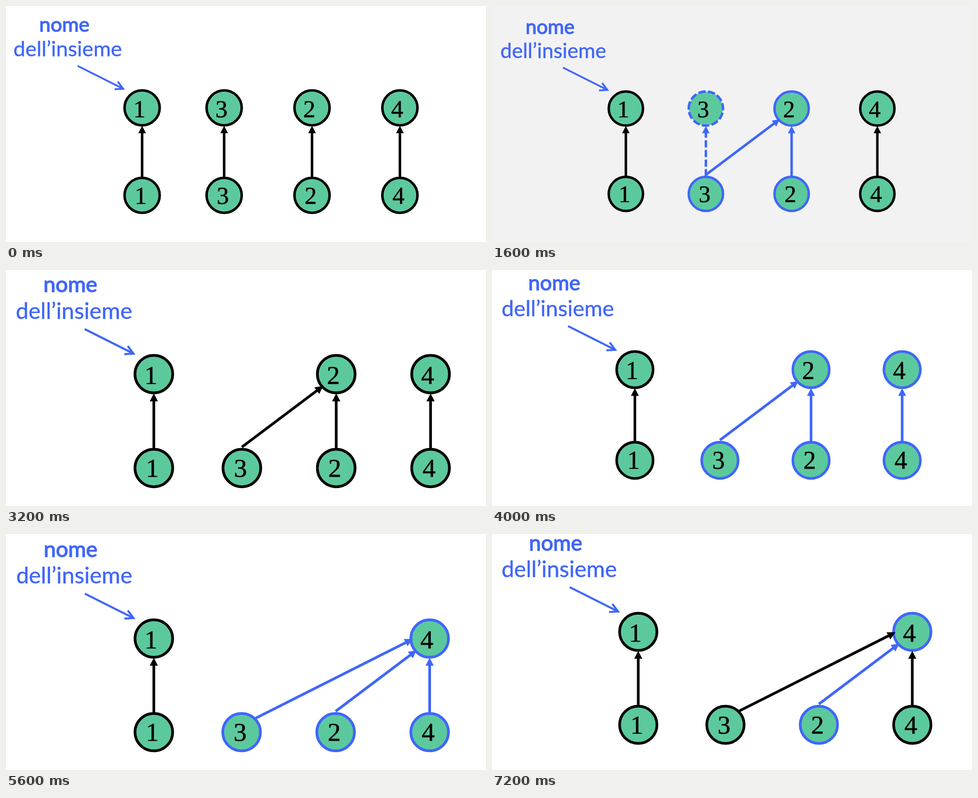
An HTML page with a canvas that plays this animation: 1065 by 526 pixels, repeating every 8000 ms.

```html
<!DOCTYPE html>
<html lang="it">
<head>
<meta charset="utf-8">
<title>Unione di insiemi</title>
<style>
  html, body { margin: 0; width: 100%; height: 100%; overflow: hidden; background: #fff; }
  canvas { display: block; }
</style>
</head>
<body>
<canvas id="stage" width="1065" height="526"></canvas>
<script>
const ctx = document.getElementById('stage').getContext('2d');
const STEP = 800;
const BLACK = '#000', BLUE = '#4066fa', GREEN = '#5cc99d';
const LINE = 5.6, RADIUS = 39, DROP = 195, DASH = [16.5, 5.5];
const columns = { 1: 0, 3: 182, 2: 377, 4: 572 };

// Each link is child, parent, style: k = black, b = blue, d = dashed blue.
// x, y: centre of the first root; span: distance from first to last column.
const scenes = [
  { x: 302,   y: 227,   span: 572, links: '11k 33k 22k 44k' },
  { x: 309.5, y: 237.5, span: 589, links: '11k 33b 22b 44k' },
  { x: 297,   y: 228.5, span: 558, links: '11k 33d 32b 22b 44k', paper: '#f2f2f2' },
  { x: 318,   y: 232,   span: 604, links: '11k 32b 22b 44k' },
  { x: 328,   y: 232,   span: 614, links: '11k 32k 22k 44k' },
  { x: 317,   y: 222,   span: 593, links: '11k 32b 22b 44b' },
  { x: 326,   y: 232.5, span: 614, links: '11k 32d 22d 34b 24b 44b' },
  { x: 328,   y: 233,   span: 612, links: '11k 34b 24b 44b' },
  { x: 305,   y: 235.5, span: 614, links: '11k 34k 24k 44k' },
  { x: 324.5, y: 218,   span: 608, links: '11k 34k 24b 44k' }
];

const colorOf = style => style === 'k' ? BLACK : BLUE;

function write(text, x, y, font, color, weight) {
  ctx.font = font;
  ctx.fillStyle = ctx.strokeStyle = color;
  ctx.lineWidth = weight;
  ctx.lineJoin = 'round';
  ctx.textAlign = 'center';
  ctx.fillText(text, x, y);
  ctx.strokeText(text, x, y);
  ctx.lineJoin = 'miter';
}

function strokePath(points, color, width) {
  ctx.beginPath();
  points.forEach(([x, y]) => ctx.lineTo(x, y));
  ctx.strokeStyle = color;
  ctx.lineWidth = width;
  ctx.stroke();
}

function drawLabel() {
  write('nome', -172.5, -170.5, '45px Lato, sans-serif', BLUE, 1.5);
  write('dell’insieme', -165, -115, '47px Lato, sans-serif', BLUE, 0.5);
  strokePath([[-143, -93.5], [-42, -42.5]], BLUE, 4.2);
  strokePath([[-61, -41.5], [-42, -42.5], [-54, -58.5]], BLUE, 4.2);
}

function drawNode(name, isRoot, style) {
  const x = columns[name], y = isRoot ? 0 : DROP;
  ctx.beginPath();
  ctx.arc(x, y, RADIUS, Math.PI, 3 * Math.PI);
  ctx.fillStyle = GREEN;
  ctx.fill();
  ctx.strokeStyle = colorOf(style);
  ctx.lineWidth = LINE;
  ctx.setLineDash(style === 'd' ? DASH : []);
  ctx.stroke();
  ctx.setLineDash([]);
  write(name, x - (isRoot ? 6 : 3), y + (isRoot ? 20.5 : 18.5),
    '54px "Liberation Serif", "Times New Roman", serif', BLACK, 0.6);
}

function linkEnds(child, parent) {
  const from = columns[child], to = columns[parent];
  if (child === parent) return [from, 155, to, 40];
  if (to - from > 300) return [from + 29, 166, to - 35, 1];
  return [from, 151.5, to - 27, 24.5];
}

function drawArrow([x1, y1, x2, y2], style) {
  const length = Math.hypot(x2 - x1, y2 - y1), head = 16.5;
  ctx.save();
  ctx.translate(x1, y1);
  ctx.rotate(Math.atan2(y2 - y1, x2 - x1));
  ctx.setLineDash(style === 'd' ? DASH : []);
  strokePath([[0, 0], [length - head + 1, 0]], colorOf(style), LINE);
  ctx.beginPath();
  ctx.moveTo(length, 0);
  ctx.lineTo(length - head, -8.5);
  ctx.lineTo(length - head, 8.5);
  ctx.fillStyle = colorOf(style);
  ctx.fill();
  ctx.restore();
}

function drawScene({ x, y, span, links, paper = '#fff' }) {
  const scale = span / columns[4];
  const list = links.split(' ').map(([child, parent, style]) => ({ child, parent, style }));
  ctx.setTransform(1, 0, 0, 1, 0, 0);
  ctx.fillStyle = paper;
  ctx.fillRect(0, 0, 1065, 526);
  ctx.setTransform(scale, 0, 0, scale, x, y);
  drawLabel();
  for (const name of Object.keys(columns)) {
    const active = list.some(l => l.child === name && l.style !== 'k');
    drawNode(name, false, active ? 'b' : 'k');
    const own = list.find(l => l.child === name && l.parent === name);
    const joined = list.some(l => l.parent === name && l.style === 'b');
    if (own) drawNode(name, true, joined ? 'b' : own.style);
  }
  list.forEach(l => drawArrow(linkEnds(l.child, l.parent), l.style));
}

const start = performance.now();
function tick() {
  const elapsed = Math.max(0, performance.now() - start);
  drawScene(scenes[Math.floor(elapsed / STEP) % scenes.length]);
  requestAnimationFrame(tick);
}
tick();
</script>
</body>
</html>
```
